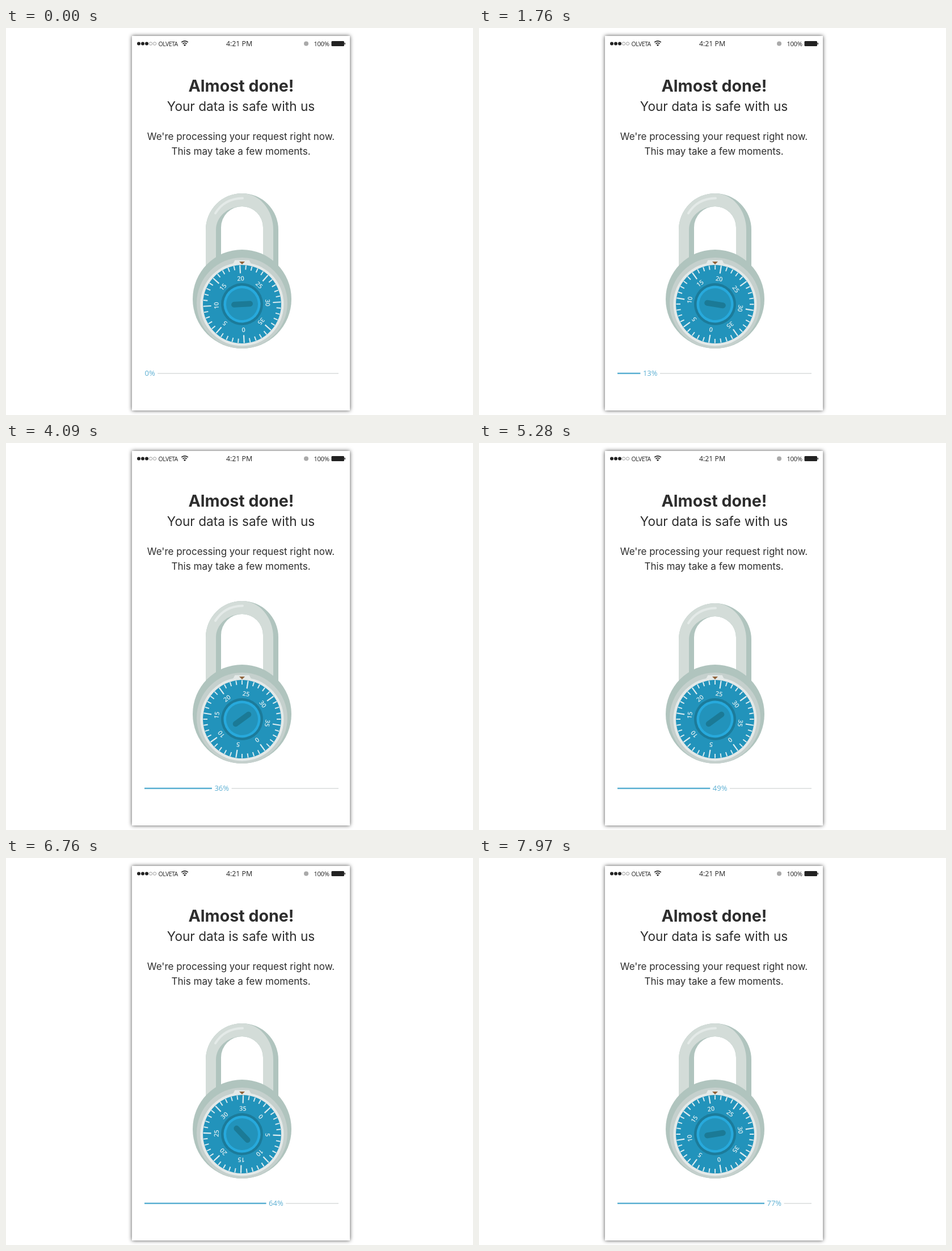
Animation of 823 by 681 pixels, one loop 8000 ms. Source, as an HTML page:

```html
<!DOCTYPE html>
<html lang="en">
<head>
<meta charset="utf-8">
<title>Almost done</title>
<style>
  html, body { margin: 0; width: 100%; height: 100%; overflow: hidden; background: #fff; }
  svg { display: block; width: 823px; height: 681px; }
  .card { fill: #fff; filter: drop-shadow(0 0 3.5px rgba(0, 0, 0, .7)); }
  .copy { font-family: Inter, sans-serif; fill: #2d2d2d; text-anchor: middle; }
  .status { font-family: "Open Sans", sans-serif; fill: #222; }
  .mark { font: 600 11px "Open Sans", sans-serif; font-stretch: 75%; fill: #dcecf0; text-anchor: middle; }
  .percent { font: 500 13px "Open Sans", sans-serif; fill: #5aaed2; }
</style>
</head>
<body>
<svg viewBox="0 0 823 681">
  <rect class="card" x="222" y="14" width="384" height="659"/>

  <g class="status">
    <circle cx="234" cy="27.5" r="3"/>
    <circle cx="241" cy="27.5" r="3"/>
    <circle cx="248" cy="27.5" r="3"/>
    <g fill="none" stroke="#888" stroke-width=".8">
      <circle cx="255" cy="27.5" r="2.7"/>
      <circle cx="262" cy="27.5" r="2.7"/>
    </g>
    <text x="268.5" y="31.5" font-size="10.5" letter-spacing="-.5">OLVETA</text>
    <g fill="none" stroke="#222" stroke-width="1.7">
      <path d="M309.3 25.2a8 8 0 0 1 11.4 0"/>
      <path d="M311.5 27.8a5 5 0 0 1 7 0"/>
    </g>
    <path d="M312.9 29.8a3 3 0 0 1 4.2 0L315 32z"/>
    <text x="388" y="32" font-size="12.3">4:21 PM</text>
    <circle cx="529" cy="27.5" r="4" fill="#aaa"/>
    <text x="542.5" y="32" font-size="11.3" letter-spacing="-.4">100%</text>
    <rect x="573.5" y="23" width="22.5" height="9" rx="1.5"/>
    <rect x="596.6" y="25.8" width="1.4" height="3.4" rx=".7"/>
  </g>

  <g class="copy">
    <text x="414.5" y="111.5" font-size="28.6" font-weight="700">Almost done!</text>
    <text x="414" y="146" font-size="22.6">Your data is safe with us</text>
    <text x="414" y="196.5" font-size="17">We're processing your request right now.</text>
    <text x="414" y="223" font-size="17.1">This may take a few moments.</text>
  </g>

  <g id="shackle">
    <path fill="#b0c4be" d="M352 510V355a64 64 0 0 1 128 0V510H453V351a37 37 0 0 0-74 0V510z"/>
    <path fill="#d3dcd8" d="M352 510V355A64 64 0 0 1 416 291A55 64 0 0 1 471 355V510H453V351A37 37 0 0 0 416 314A46 41 0 0 0 370 355V510z"/>
    <path fill="none" stroke="#e4eae8" stroke-width="4" stroke-linecap="round" d="M369 326Q385 300 417 299.5"/>
  </g>

  <circle cx="416" cy="477" r="87" fill="#b0c4be"/>
  <circle cx="416" cy="484" r="80" fill="#c5d0cd"/>
  <circle cx="416" cy="486" r="73.5" fill="#e4e9e8"/>
  <path d="M398 419l5.5-10.5h25l5.5 10.5z" fill="#e4e9e8"/>
  <path d="M411 411h10l-5 5z" fill="#8f6239"/>

  <g id="dial">
    <circle r="69" fill="#2293bb"/>
    <g id="scale"></g>
    <circle r="37" fill="#1c7b9a"/>
    <circle r="32.5" fill="#27a9dc"/>
    <circle r="28" fill="#2293bb"/>
    <rect x="-19" y="-5" width="38" height="10" rx="5" fill="#1b7a96"/>
  </g>

  <path id="rest" stroke="#d9dcdc" stroke-width="1.5"/>
  <path id="bar" stroke="#5bb0d2" stroke-width="2.5"/>
  <text id="percent" class="percent" y="612"></text>
</svg>

<script>
const LOOP = 8000;
const STALL = [6390, 6550];

// [time in ms, value]
const TURNS = [[-180, 180], [1255, 99], [2520, 360], [3775, 144], [5520, 144], [6875, 45], [8090, 174]];
const LIFT = [[3778, 0], [4656, -46.5], [5535, 0]];
const PROGRESS = [[500, 0], [1760, 13.1], [3030, 26.1], [4090, 36.9], [5280, 49.2], [6760, 64.4], [8000, 77.4]];

const $ = id => document.getElementById(id);
const linear = u => u;
const sineInOut = u => (1 - Math.cos(Math.PI * u)) / 2;

function valueAt(steps, t, ease) {
  if (t <= steps[0][0]) return steps[0][1];
  const next = steps.findIndex(step => step[0] > t);
  if (next < 0) return steps[steps.length - 1][1];
  const [t0, a] = steps[next - 1];
  const [t1, b] = steps[next];
  return a + (b - a) * ease((t - t0) / (t1 - t0));
}

function addToScale(tag, attributes, text = "") {
  const node = document.createElementNS("http://www.w3.org/2000/svg", tag);
  for (const name in attributes) node.setAttribute(name, attributes[name]);
  node.textContent = text;
  $("scale").append(node);
}

for (let n = 0; n < 40; n++) {
  const major = n % 5 === 0;
  const transform = `rotate(${n * 9})`;
  addToScale("path", {
    d: `M0-68.5v${major ? 14 : 7.5}`,
    stroke: "#dcecf0",
    "stroke-width": major ? 2.2 : 1.9,
    transform
  });
  if (major) addToScale("text", { class: "mark", y: -41.3, transform }, n);
}

function drawProgress(percent) {
  const label = $("percent");
  const x = 244.5 + 3.415 * percent;
  const text = percent + "%";
  if (label.textContent !== text) label.textContent = text;
  label.setAttribute("x", x);
  const end = x + label.getComputedTextLength() + 4.5;
  $("rest").setAttribute("d", `M${end} 607.8H586`);
  $("bar").setAttribute("d", `M244 607.8H${Math.max(244, x - 4.5)}`);
}

function draw() {
  let t = performance.now() % LOOP;
  if (t > STALL[0] && t < STALL[1]) t = STALL[0];
  $("dial").setAttribute("transform", `translate(416 486) rotate(${valueAt(TURNS, t, sineInOut)})`);
  $("shackle").setAttribute("transform", `translate(0 ${valueAt(LIFT, t, sineInOut)})`);
  drawProgress(Math.floor(valueAt(PROGRESS, t, linear)));
  requestAnimationFrame(draw);
}
draw();
</script>
</body>
</html>
```
